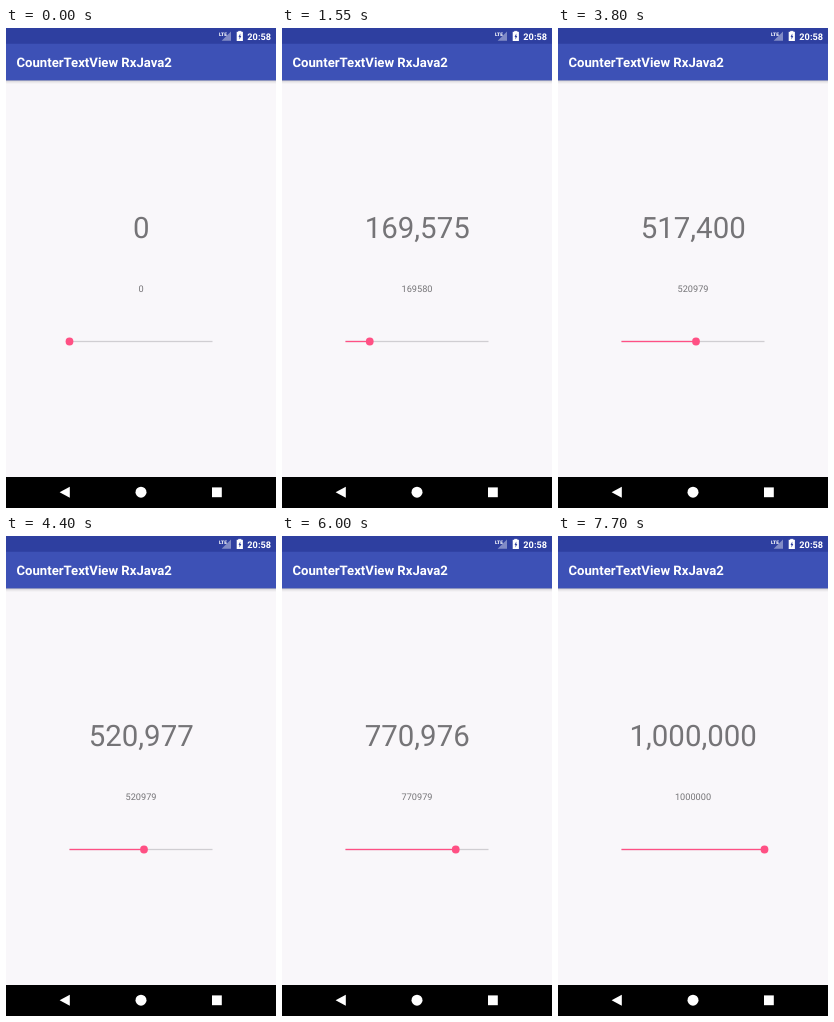
An HTML page with a canvas for the animation above (8000 ms loop, 270 by 480 pixels).

```html
<!DOCTYPE html>
<html lang="en">
<head>
<meta charset="utf-8">
<title>Counter</title>
<style>
  html, body { margin: 0; width: 100%; height: 100%; overflow: hidden; background: #f9f7fa; }
  canvas, svg { position: absolute; left: 0; top: 0; width: 270px; height: 480px; display: block; }
  text { font-family: Roboto, "Open Sans", sans-serif; text-rendering: geometricPrecision; }
  .bar { fill: #fff; font-weight: 600; }
  .num { fill: #757477; text-anchor: middle; }
</style>
</head>
<body>
<canvas id="stage"></canvas>
<svg viewBox="0 0 270 480">
  <text class="bar" x="213" y="8.2" font-size="4.8" style="font-weight:900">LTE</text>
  <text class="bar" x="265" y="11.6" font-size="9.19" text-anchor="end">20:58</text>
  <text class="bar" x="10.5" y="39.2" font-size="13.13">CounterTextView RxJava2</text>
  <text class="num" id="count" x="135.2" y="209.8" font-size="29.45">0</text>
  <text class="num" id="label" x="135" y="264.2" font-size="9.19">0</text>
</svg>
<script>
const LOOP = 8000, TICK = 50;
const MAX = 1e6, LEFT = 63.5, SPAN = 143, MID = 313.5;
const ACCENT = '#ff5084';

const canvas = document.getElementById('stage');
const countText = document.getElementById('count');
const labelText = document.getElementById('label');
const ctx = canvas.getContext('2d');
const scale = window.devicePixelRatio || 1;
canvas.width = 270 * scale;
canvas.height = 480 * scale;

// A finger lands at `down`; the counter reaches `value` at `end`,
// having `left` still to go at `mark`.
const taps = [
  { down: 500, y: 315, value: 169580, mark: 1550, left: 5, end: 1700 },
  { down: 2000, y: 310, value: 344406, mark: 2600, left: 994, end: 3200 },
  { down: 3550, y: 312, value: 520979, mark: 3800, left: 3579, end: 4500 },
  { down: 5050, y: 311, value: 770979, mark: 5300, left: 38785, end: 6100 },
  { down: 6500, y: 313, value: MAX, mark: 7000, left: 173481, end: 7700 }
];
const HOLD = 150;
const drag = taps[taps.length - 1];
const DRAG_TIME = 650, DRAG_LAG = 200;

const toX = value => LEFT + SPAN * value / MAX;

// The finger speeds up evenly, given here as a slider value.
const dragValue = age => 770979 + 166084 * (Math.max(0, age) / 300) ** 2;

// Geometric decay that reaches zero at the end
function remaining(tap, t) {
  const power = Math.max(0, (tap.end - t) / (tap.end - tap.mark));
  return Math.round((tap.left + 1) ** power - 1);
}

function stateAt(t) {
  const s = { value: 0, count: 0, finger: null, pressed: false };
  for (const tap of taps) {
    const age = t - tap.down;
    if (age < 0) break;
    if (tap === drag) {
      if (age < DRAG_TIME) {
        s.finger = [Math.min(261, toX(dragValue(age))), Math.max(295, tap.y - age * 0.03)];
      }
      s.value = Math.min(MAX, Math.round(dragValue(age - DRAG_LAG)));
      s.pressed = age >= HOLD && age < DRAG_TIME + HOLD;
    } else if (age < HOLD) {
      s.finger = [toX(tap.value), tap.y];
    } else {
      s.value = tap.value;
    }
    if (age >= HOLD) s.count = Math.max(s.count, tap.value - remaining(tap, t));
  }
  return s;
}

function rect(x, y, w, h, fill) {
  ctx.fillStyle = fill;
  ctx.fillRect(x, y, w, h);
}

function disc(x, y, r, fill) {
  ctx.fillStyle = fill;
  ctx.beginPath();
  ctx.arc(x, y, r, 0, Math.PI * 2);
  ctx.fill();
}

function poly(points, fill) {
  ctx.fillStyle = fill;
  ctx.beginPath();
  points.forEach(([x, y]) => ctx.lineTo(x, y));
  ctx.closePath();
  ctx.fill();
}

function drawChrome() {
  rect(0, 0, 270, 480, '#f9f7fa');
  const shade = ctx.createLinearGradient(0, 52, 0, 56);
  shade.addColorStop(0, 'rgba(0,0,0,.27)');
  shade.addColorStop(0.4, 'rgba(0,0,0,.09)');
  shade.addColorStop(1, 'rgba(0,0,0,0)');
  rect(0, 52, 270, 4, shade);
  rect(0, 0, 270, 52.4, '#3d51b6');
  rect(0, 0, 270, 15.75, '#2e3fa0');

  // Signal and battery
  poly([[225, 3.4], [225, 12.8], [215.6, 12.8]], 'rgba(255,255,255,.4)');
  rect(230.7, 3.8, 6.2, 9.2, '#fff');
  rect(232.2, 2.9, 3.2, 1, '#fff');
  poly([[234.3, 5.4], [232.5, 8.9], [233.5, 8.9], [233.5, 11.5], [235.3, 8], [234.3, 8]], '#2e3fa0');

  // Navigation
  rect(0, 449, 270, 31, '#000');
  poly([[53.6, 464.2], [63.8, 458.7], [63.8, 469.7]], '#fff');
  disc(135, 464.2, 5.5, '#fff');
  rect(206, 459.4, 9.8, 9.8, '#fff');
}

function drawSlider(s) {
  const x = toX(s.value);
  rect(LEFT, MID - 0.65, SPAN, 1.3, '#d0ced2');
  rect(LEFT, MID - 0.65, x - LEFT, 1.3, ACCENT);
  if (s.pressed) disc(x, MID, 8.5, 'rgba(0,0,0,.04)');
  disc(x, MID, s.pressed ? 5.1 : 3.9, ACCENT);
}

function drawFinger([x, y]) {
  disc(x, y, 7.5, 'rgba(255,255,255,.4)');
  ctx.strokeStyle = '#d2d0d8';
  ctx.lineWidth = 1.2;
  ctx.beginPath();
  ctx.arc(x, y, 7.3, 0, Math.PI * 2);
  ctx.stroke();
}

function setText(node, text) {
  if (node.textContent !== text) node.textContent = text;
}

function frame(now) {
  const t = Math.floor((now % LOOP) / TICK) * TICK;
  const s = stateAt(t);
  ctx.setTransform(scale, 0, 0, scale, 0, 0);
  drawChrome();
  drawSlider(s);
  if (s.finger) drawFinger(s.finger);
  setText(countText, s.count.toLocaleString('en-US'));
  setText(labelText, String(s.value));
  requestAnimationFrame(frame);
}

frame(0);
</script>
</body>
</html>
```
